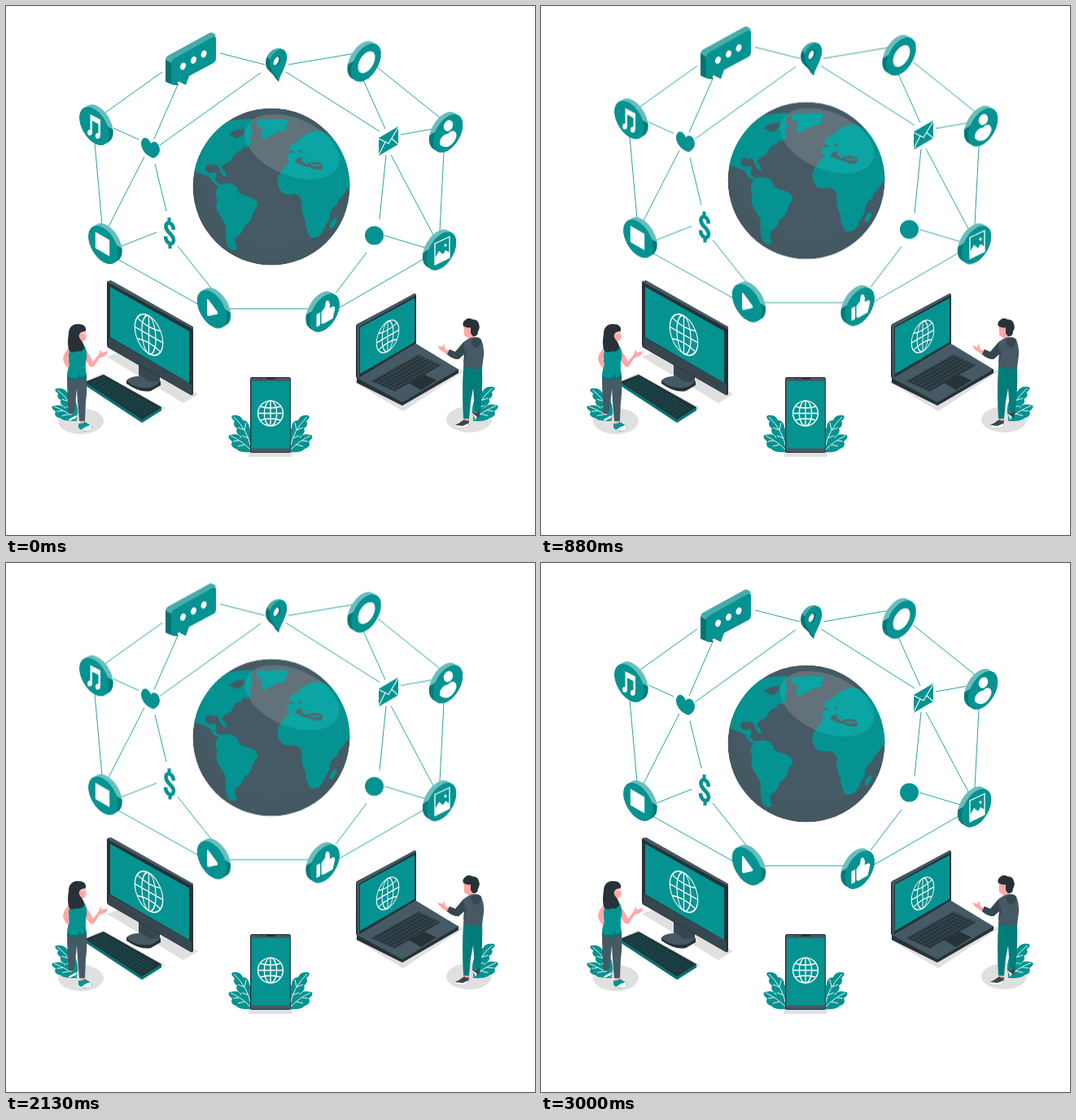
Animation, 650 px wide and 650 px high, one loop 3.04 s. Source, as an HTML page:

```html
<!DOCTYPE html>
<html lang="en">
<head>
<meta charset="utf-8">
<title>Connected world</title>
<style>
  html, body { margin: 0; width: 100%; height: 100%; overflow: hidden; background: #fff; }
  svg { display: block; width: 100vw; height: 100vh; }
  .teal { fill: #049391; }
  .deep { fill: #037473; }
  .light { fill: #45adab; }
  .slate { fill: #455a64; }
  .steel { fill: #37474f; }
  .ink { fill: #263238; }
  .skin { fill: #ffa8a7; }
  .white { fill: #fff; }
  .shade { fill: #e0e0e0; }
  .line { fill: none; stroke: #fff; }
  .links { fill: none; stroke: #049391; stroke-width: .85; }
  /* 36 even steps up, 36 down, then one held step */
  .float { animation: float 3040ms infinite; }
  @keyframes float {
    0% { transform: translateY(0); animation-timing-function: steps(36); }
    49.342% { transform: translateY(-12.9px); animation-timing-function: steps(36); }
    98.684%, 100% { transform: translateY(0); }
  }
</style>
</head>
<body>
<svg viewBox="0 0 650 650">
  <defs>
    <linearGradient id="rimL" gradientUnits="userSpaceOnUse" x1="0" x2="0" y1="-30" y2="30">
      <stop offset=".34" stop-color="#68bebd"/><stop offset=".36" stop-color="#037a79"/>
    </linearGradient>
    <linearGradient id="rimR" gradientUnits="userSpaceOnUse" x1="0" x2="0" y1="-30" y2="30">
      <stop offset=".31" stop-color="#68bebd"/><stop offset=".33" stop-color="#037a79"/>
    </linearGradient>
    <g id="coin" transform="translate(-2.5 1.5) matrix(.866 .5 0 1 0 0)">
      <path d="M0 0l5.8-5.9" stroke-width="42" stroke-linecap="round"/>
      <circle r="21" class="teal" stroke="none"/>
    </g>
    <g id="web" class="line">
      <circle r="20"/>
      <ellipse rx="10" ry="20"/>
      <path d="M0-20V20M-20 0H20M-16.5-11Q0-6 16.5-11M-16.5 11Q0 6 16.5 11"/>
    </g>
    <g id="plant">
      <path class="teal" d="M0 0C-8-5-12-10-12-16C-17-18-19-23-17-26C-21-28-22-32-20-35C-24-38-25-41-22-42C-16-43-12-41-10-36C-5-36-2-32-2-27C1-23 2-15 2-8Z"/>
      <path class="teal" d="M1 3C-8 4-15 3-18-1C-24-2-25-7-23-10C-28-13-29-18-25-18C-18-20-14-18-12-14C-6-14-2-9 1-3Z"/>
      <path class="line" stroke-width=".9" d="M0-2Q-4-24-21-40M-3-14L-11-17M-8-24L-16-27M-8-24L-6-33M0 1Q-10-10-25-17M-8-6L-16-4M-15-11L-22-10"/>
    </g>
    <g id="land">
      <path d="M225 200L250 150Q275 138 303 139Q299 147 303 156Q297 161 302 169L296 174Q291 171 290 177Q280 179 277 190Q268 193 265 199Q271 204 271 210Q264 209 262 199Q259 193 254 196Q246 191 245 201Q249 208 257 204Q260 207 257 213Q260 219 266 219L262 222Q254 219 251 211Q243 206 232 204Z"/>
      <path d="M258 227Q263 216 275 218Q284 219 287 230Q294 234 301 235Q310 239 309 246Q303 253 302 260Q299 267 293 270Q291 280 283 283Q280 289 284 298Q278 303 273 297Q268 285 270 272Q268 264 261 255Q256 245 260 239Q257 233 258 227Z"/>
      <path d="M308 142Q312 138 322 140Q336 138 347 140Q348 144 343 147Q347 151 341 154Q334 153 331 157Q323 159 318 164Q313 163 314 156Q318 151 313 149Q307 149 308 142Z"/>
      <path d="M349 180Q346 168 357 168Q365 157 378 154Q390 152 398 160Q430 185 428 221L419 225Q415 233 408 239Q409 244 403 247Q397 252 398 261Q392 269 389 278Q383 287 374 284Q368 276 368 264Q361 250 364 241Q361 232 354 231Q340 234 336 225Q331 217 335 208Q341 201 344 195Q353 190 346 190Q344 183 349 180Z"/>
      <path d="M398 271Q398 264 405 260Q409 264 402 272Q399 275 398 271Z"/>
    </g>
    <clipPath id="ball"><circle cx="326" cy="222" r="96.5"/></clipPath>
    <clipPath id="glow"><ellipse cx="351.500" cy="173" rx="61" ry="35" transform="rotate(23 351.500 173)"/></clipPath>
  </defs>

  <g class="float">
    <path class="links" d="M263 58L318 72M347 72L430 58M457 76L534 138M538 180L533 276M513 311L409 371M371 372H275M237 367L137 311M118 269L109 168M122 131L192 81"/>
    <path class="links" d="M211 97L182 163M132 150L163 164M189 171L313 82M170 185L126 271M183 194L197 252M185 278L142 295M211 295L254 349"/>
    <path class="links" d="M344 81L459 154M439 91L466 151M485 158L525 151M473 183L526 283M467 183L459 262M465 282L515 297M443 303L405 353"/>

    <!-- globe -->
    <g clip-path="url(#ball)">
      <circle class="slate" cx="326" cy="222" r="96.5"/>
      <use href="#land" class="teal"/>
      <path fill="#263238" opacity=".06" d="M281 128A86 86 0 0 0 380 284L412 270L360 330H220V120Z"/>
      <g clip-path="url(#glow)">
        <rect x="285" y="125" width="135" height="100" fill="#62727b"/>
        <use href="#land" fill="#0ba5a3"/>
      </g>
      <path class="slate" d="M274 158Q280 151 292 151Q295 154 289 160Q282 164 279 160Z"/>
      <path fill="#53666f" d="M355 191Q360 184 366 187L372 193Q378 190 387 193Q391 198 387 201Q379 202 373 198Q363 197 355 191ZM347 180Q352 175 353 181ZM359 178L364 177 363 181Z"/>
      <path fill="#0ba5a3" d="M365 186L371 193 369 195 363 189ZM373 193Q379 197 385 194L386 196Q380 198 375 196Z"/>
    </g>

    <!-- speech bubble -->
    <path class="deep" d="M196 66L202 62 209 92 212 97Q205 98 196 93Z"/>
    <path class="light" d="M196 66Q196 63 199 61L250 33Q253 31 258 36L203 70Z"/>
    <path class="deep" d="M211 91L216 89 221 97 215 94Z"/>
    <path class="teal" d="M203 71Q203 67 206 65L254 38Q258 36 258 40V65Q258 68 255 70L225 86 221 97 214 92 206 96.500Q203 98 203 94Z"/>
    <g class="white">
      <ellipse cx="217.500" cy="74" rx="3.200" ry="4.500" transform="rotate(22 217.500 74)"/>
      <ellipse cx="230.500" cy="66.500" rx="3.200" ry="4.500" transform="rotate(22 230.500 66.500)"/>
      <ellipse cx="243" cy="59" rx="3.200" ry="4.500" transform="rotate(22 243 59)"/>
    </g>

    <!-- map pin -->
    <path class="deep" d="M335 93L331 89C329 82 319 80 319 70C319 60 328 51 337 52L342 55Z"/>
    <path class="light" d="M321 62Q327 51 337 52L342 55 328 60 324 66Z"/>
    <path class="teal" d="M335 93C333 84 324 80 324 70C324 61 332 53 339 53C344 54 346 60 345 66C343 77 337 84 335 93Z"/>
    <ellipse class="deep" cx="333" cy="67" rx="4" ry="6.500" transform="rotate(24 333 67)"/>
    <ellipse class="white" cx="332" cy="67.500" rx="2.700" ry="5.500" transform="rotate(24 332 67.500)"/>

    <!-- heart, dollar, dot, envelope -->
    <path class="teal" d="M181 187C173 184 167 178 166 170C166 162 171 160 175 164Q177 166 178 169C182 164 188 168 189 176C189 181 186 185 181 187Z"/>
    <path fill="none" stroke="#049391" stroke-width="4.600" d="M206 275C205 265 196 264 196.500 271C197 279 206 280 206 288C205 296 196 291 196 283"/>
    <path fill="none" stroke="#049391" stroke-width="4" d="M200.500 260V268M201.500 290V298"/>
    <circle class="teal" cx="452.500" cy="282" r="11.500"/>
    <path class="teal" d="M458 162L482 148V170L458 184Z"/>
    <path class="line" stroke-width="1.100" d="M458 163L470 169 482 149M458 183L466 167M482 170L474 163"/>

    <!-- coins -->
    <g stroke="url(#rimL)">
      <use href="#coin" transform="translate(111 146)"/>
      <use href="#coin" transform="translate(122 292)"/>
      <use href="#coin" transform="translate(255.500 371)"/>
    </g>
    <g stroke="url(#rimR)">
      <use href="#coin" transform="translate(440 68) scale(-1 1)"/>
      <use href="#coin" transform="translate(540.500 155) scale(-1 1)"/>
      <use href="#coin" transform="translate(532.500 299.500) scale(-1 1)"/>
      <use href="#coin" transform="translate(389 375.500) scale(-1 1)"/>
    </g>
    <g class="white">
      <path d="M103.500 133L116 139.500V159H113.500V145L106 141V156H103.500Z"/>
      <ellipse cx="103" cy="155.500" rx="2.900" ry="3.500"/>
      <ellipse cx="112.800" cy="159.500" rx="2.900" ry="3.500"/>
      <rect x="-10" y="-10" width="20" height="20" transform="matrix(.866 .5 0 1 118.500 292.500)"/>
      <path d="M247 361Q247 359 249 361L260 376Q261 379 258 379L249 381Q247 381 247 379Z"/>
      <circle r="12" transform="matrix(.866 -.5 0 1 443 69)"/>
      <ellipse cx="543.500" cy="147" rx="5.500" ry="7" transform="rotate(22 543.500 147)"/>
      <path d="M533 170C532 163 538 157 543 157C548 151 554 153 553.500 160C551 170 541 178 533 170Z"/>
      <path d="M527 310L532 301 537 305 540 300 545 303V309L527 318Z"/>
      <circle cx="540" cy="294" r="1.700"/>
      <path d="M381.500 379L386 376.500V392L381.500 394.500ZM387.500 376L392 370 393 363Q397 360 398 367L397.500 371 402 369Q405 369 404 373L401.500 384 390 390.500 387.500 390Z"/>
    </g>
    <path class="line" stroke-width="1.300" d="M527 292L545 283.500V309L527 318Z"/>
  </g>

  <!-- desktop computer -->
  <path class="shade" d="M124 431L145 423 236 477 218 488Z"/>
  <path class="ink" d="M148 460V464Q165 476 178 473L190 466V461Z"/>
  <path class="slate" d="M148 460Q153 455 163 455V443L189 457V462Q180 471 167 469Q155 468 148 460Z"/>
  <path class="steel" d="M163 440L189 454V461L176 462 163 452Z"/>
  <path class="ink" d="M124 340Q124 337 128 338L229 394.500Q230 395 230 398V476Q230 479 227 478L126 420Q124 419 124 416Z"/>
  <path class="slate" d="M126 338L129 337 230 394V397L126 340Z"/>
  <path class="steel" d="M126 407L228 465V478L126 419Z"/>
  <path class="teal" d="M128 345L225 399.500V463L128 407Z"/>
  <use href="#web" stroke-width="1.400" transform="matrix(.86 .49 0 1.160 175.500 404)"/>

  <!-- keyboard -->
  <path class="shade" d="M93 464L118 451 196 494 168 513Z"/>
  <path class="deep" d="M97 462L120 453 191 493V497L167 512 97 466Z"/>
  <path class="ink" d="M97 462L120 453 191 493 167 508Z"/>
  <path transform="matrix(.69 .43 .22 -.11 98 463)" fill="none" stroke="#035453" stroke-width="8" stroke-dasharray="5 1.800" d="M5 14H96M4 31H97M5 48H96M4 65H97M5 82H96"/>

  <!-- laptop -->
  <path class="shade" d="M428 462L505 420 562 449 488 498Z"/>
  <path class="ink" d="M431 457V463L487 491 556 451V446Z"/>
  <path class="slate" d="M431 457L504 415 556 446.500 487 487Z"/>
  <path class="ink" d="M430 394Q430 391 433 390L501 354Q504 352 504 356V415L433 457Q430 458 430 454Z"/>
  <path class="slate" d="M431 392L502 353 504 355 434 394V456L432 457Z"/>
  <path class="teal" d="M435 395L502 359V413L435 452Z"/>
  <use href="#web" stroke-width="1.400" transform="matrix(.69 -.4 0 .92 469 406)"/>
  <path class="steel" d="M448 461L507 428 535 441 477 474Z"/>
  <path transform="matrix(.58 -.33 .28 .13 449 461)" fill="none" stroke="#263238" stroke-width="12" stroke-dasharray="5 1.800" d="M2 9H98M2 26H98M2 43H98M2 60H98M2 77H98M2 94H98"/>
  <path class="ink" d="M495 463L514 453 529 460 510 472Z"/>

  <!-- phone -->
  <path class="shade" d="M299 546H353L351 554H298Z"/>
  <use href="#plant" transform="translate(301 545)"/>
  <use href="#plant" transform="translate(349 545) scale(-1 1)"/>
  <rect class="ink" x="300" y="456" width="50" height="93" rx="2.500"/>
  <rect class="slate" x="301" y="457" width="48.500" height="91" rx="2"/>
  <path class="ink" d="M313 457.500H315V459H313ZM320 457H331V459H320Z"/>
  <rect class="teal" x="302" y="461" width="46.500" height="82.500"/>
  <use href="#web" stroke-width="1.800" transform="translate(325 500.500) scale(.77)"/>

  <!-- woman -->
  <ellipse class="shade" cx="92" cy="510" rx="28" ry="16"/>
  <use href="#plant" transform="translate(86 507) scale(1.080 .88)"/>
  <path class="skin" d="M77 496H83V504H77ZM91 506H97V515H91Z"/>
  <path class="slate" d="M75 453H99Q100 474 98 486L97 510H90L88 487 87 470 84 501H77Q75 480 75 453Z"/>
  <path class="teal" d="M76 502Q80 505 84 498Q89 501 86 504L78 510ZM89 513Q94 514 97 511L105 516Q107 519 103 521Q95 525 89 518Z"/>
  <path class="white" d="M77 508L86 503Q88 505 84 507L78 510ZM98 517L104 515Q107 519 103 521Q98 523 92 521Z"/>
  <path class="skin" d="M79 418Q70 427 70 434Q72 442 77 445L79 440 76 433 83 424ZM96 420Q103 428 107 437L114 428 116 422 118 426 125 424 124 428Q119 432 115 432L108 443Q104 445 101 440L94 431Z"/>
  <path class="teal" d="M80 418Q90 422 97 418Q101 428 98 437Q97 445 99 454Q88 460 75 456Q75 447 78 441Q75 429 80 418Z"/>
  <path class="deep" d="M75 455Q82 458 88 457L91 451 92 457 99 453V457Q88 462 75 458Z"/>
  <path class="skin" d="M88 398L97 396 99 404Q99 411 94 412L95 419 88 420Z"/>
  <path class="ink" d="M77 403C77 394 83 390 90 391C97 391 99 396 98 399L92 401Q88 404 91 409Q97 416 96 421Q92 426 87 424Q80 428 77 422Q75 414 77 403Z"/>
  <path class="line" stroke-width=".8" d="M92 402L98 402V405"/>

  <!-- man -->
  <ellipse class="shade" cx="569" cy="508" rx="28" ry="16"/>
  <use href="#plant" transform="translate(575 507) scale(-1.080 .93)"/>
  <path class="skin" d="M563 504H569V512H563ZM576 494H582V502H576Z"/>
  <path fill="#037d7b" d="M562 443H585Q586 468 583 499H576L574 470 571 486 569 507H562Q560 474 562 443Z"/>
  <path class="steel" d="M569 509L568 516Q560 521 552 517Q551 514 556 513L563 508Q566 511 569 509ZM582 498V504L577 508 573 499Q577 501 582 498Z"/>
  <path class="white" d="M552 515L561 516 568 513 568 516Q560 521 552 517ZM573 500L579 505 577 508Z"/>
  <path class="skin" d="M545 424L540 422 538 415 536 419 530 417 533 422 543 429ZM563 399L562 392 572 390 575 406 570 411 566 406Q562 407 563 399Z"/>
  <path class="slate" d="M568 409Q579 404 584 410Q588 419 587 429L585 445Q573 447 562 444L563 428 556 434Q549 434 542 428L545 422 552 425 562 413Z"/>
  <path class="steel" d="M571 410Q582 405 584 411Q583 420 577 420Q572 418 571 410ZM563 428L566 420 565 431 562 440ZM542 428L545 422 552 425 562 414 564 427 556 434Q549 434 542 428Z"/>
  <path class="ink" d="M562 393Q560 389 564 386Q568 382 573 385Q580 385 581 391Q583 396 580 400Q580 406 574 406L571 402 571 395Q566 396 562 393Z"/>
</svg>
</body>
</html>
```
